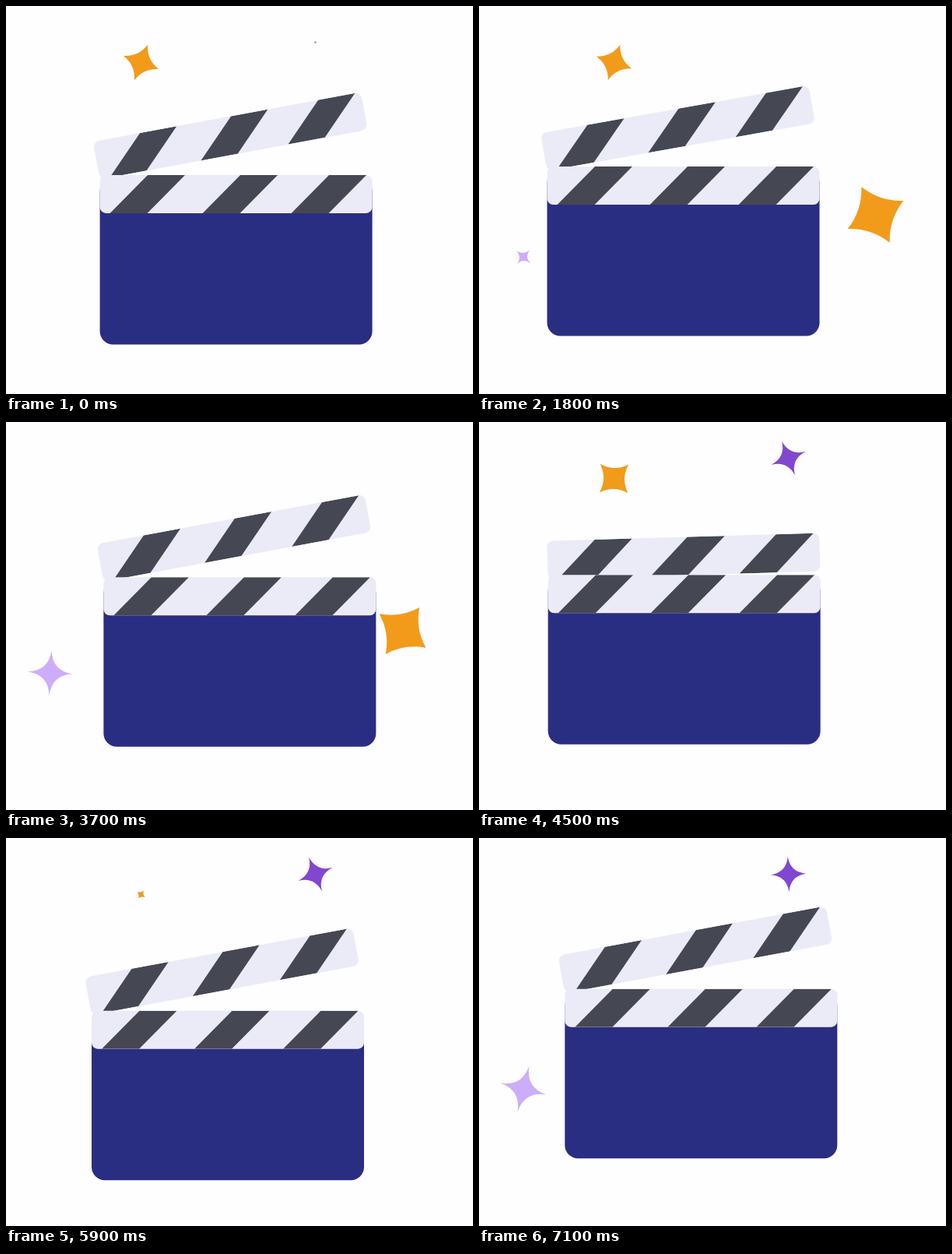
Animation of 600x498 px, one loop 7200 ms. Source, as an HTML page with a canvas:

```html
<!DOCTYPE html>
<html lang="en">
<head>
<meta charset="utf-8">
<title>Clapperboard</title>
<style>
  html, body { margin: 0; width: 100%; height: 100%; overflow: hidden; background: #fefdff; }
  canvas { display: block; }
</style>
</head>
<body>
<canvas id="stage" width="600" height="498"></canvas>
<script>
const ctx = document.getElementById('stage').getContext('2d');
const LOOP = 7.2, STEP = 0.1, CYCLE = 3.08, TWINKLE = CYCLE / 2;
const WIDTH = 350, BAR = 49, HEIGHT = 217.5;

// start, enter, exit: seconds; life: seconds until gone; bow: inward curve of the sides
const stars = [
  { x: 173.5, y: 72.5, r: 24, angle: 19, color: '#f29b1b', bow: 0.33, start: 1.262, enter: 0.3, exit: 0.16, life: 0.785 },
  { x: 397.5, y: 46.5, r: 23.5, angle: -21, color: '#8147d0', bow: 0.15, start: 0.785, enter: 0.44, exit: 0.12, life: 0.757 },
  { x: 57, y: 322, r: 29, angle: 3, color: '#ccadfa', bow: 0.11, start: 0.22, enter: 0.38, exit: 0.16, life: 0.845 },
  { x: 509.5, y: 268, r: 37, angle: 36, color: '#f29b1b', bow: 0.45, start: 0.1, enter: 0.3, exit: 0.16, life: 0.812 },
];

const mod = (a, n) => ((a % n) + n) % n;
const clamp = u => Math.max(0, Math.min(1, u));
const ramp = (t, from, to) => clamp((t - from) / (to - from));
const sine = u => (1 - Math.cos(Math.PI * u)) / 2;
const backOut = (u, c) => 1 + (c + 1) * (u - 1) ** 3 + c * (u - 1) ** 2;

function roundRect(x, y, w, h, r) {
  ctx.beginPath();
  ctx.roundRect(x, y, w, h, r);
}

function drawBar() {
  ctx.save();
  roundRect(0, 0, WIDTH, BAR, 8);
  ctx.fillStyle = '#ebebf7';
  ctx.fill();
  ctx.clip();
  ctx.fillStyle = '#454852';
  for (const x of [13, 132, 246]) {
    ctx.beginPath();
    ctx.moveTo(x, BAR);
    ctx.lineTo(x + 48.5, 0);
    ctx.lineTo(x + 96.5, 0);
    ctx.lineTo(x + 48, BAR);
    ctx.fill();
  }
  ctx.restore();
}

function drawBoard(t) {
  const late = mod(t - 0.42, CYCLE);
  const x = 87.5 + 41 * (1 - sine(ramp(late, 0, 1.12)) + sine(ramp(late, 1.63, CYCLE)));
  const y = 207.9 - 14.9 * Math.cos(2 * Math.PI * (t - 1.09) / CYCLE);
  const shut = t < 1.44 ? ramp(t, 1.15, 1.44) ** 2 : 1 - sine(ramp(t, 1.44, 1.85));
  const tilt = 10.5 - 10.2 * shut;

  ctx.save();
  ctx.translate(x, y);

  ctx.save();
  ctx.translate(0, 5.5);
  ctx.rotate(-tilt * Math.PI / 180);
  ctx.translate(0, -BAR);
  drawBar();
  ctx.restore();

  roundRect(0, 4, WIDTH, HEIGHT - 4, 17);
  ctx.fillStyle = '#2a2e82';
  ctx.fill();
  drawBar();
  ctx.restore();
}

function drawStar(star, t) {
  const age = mod(t - star.start, TWINKLE);
  if (age >= star.life) return;
  const u = clamp(Math.min(age / star.enter, (star.life - age) / star.exit));
  const r = star.r * backOut(u, 1.6);
  const turn = star.angle + 110 * (backOut(u, 3) - 1);

  ctx.save();
  ctx.translate(star.x, star.y);
  ctx.rotate(turn * Math.PI / 180);
  ctx.beginPath();
  ctx.moveTo(r, 0);
  for (let i = 1; i <= 4; i++) {
    const tip = i * Math.PI / 2, side = tip - Math.PI / 4, inner = r * star.bow;
    ctx.quadraticCurveTo(inner * Math.cos(side), inner * Math.sin(side),
      r * Math.cos(tip), r * Math.sin(tip));
  }
  ctx.fillStyle = star.color;
  ctx.fill();
  ctx.restore();
}

function frame() {
  const seconds = performance.now() / 1000 % LOOP;
  const t = Math.floor(seconds / STEP) * STEP % CYCLE;
  ctx.fillStyle = '#fefdff';
  ctx.fillRect(0, 0, 600, 498);
  drawBoard(t);
  stars.forEach(star => drawStar(star, t));
  requestAnimationFrame(frame);
}
frame();
</script>
</body>
</html>
```
